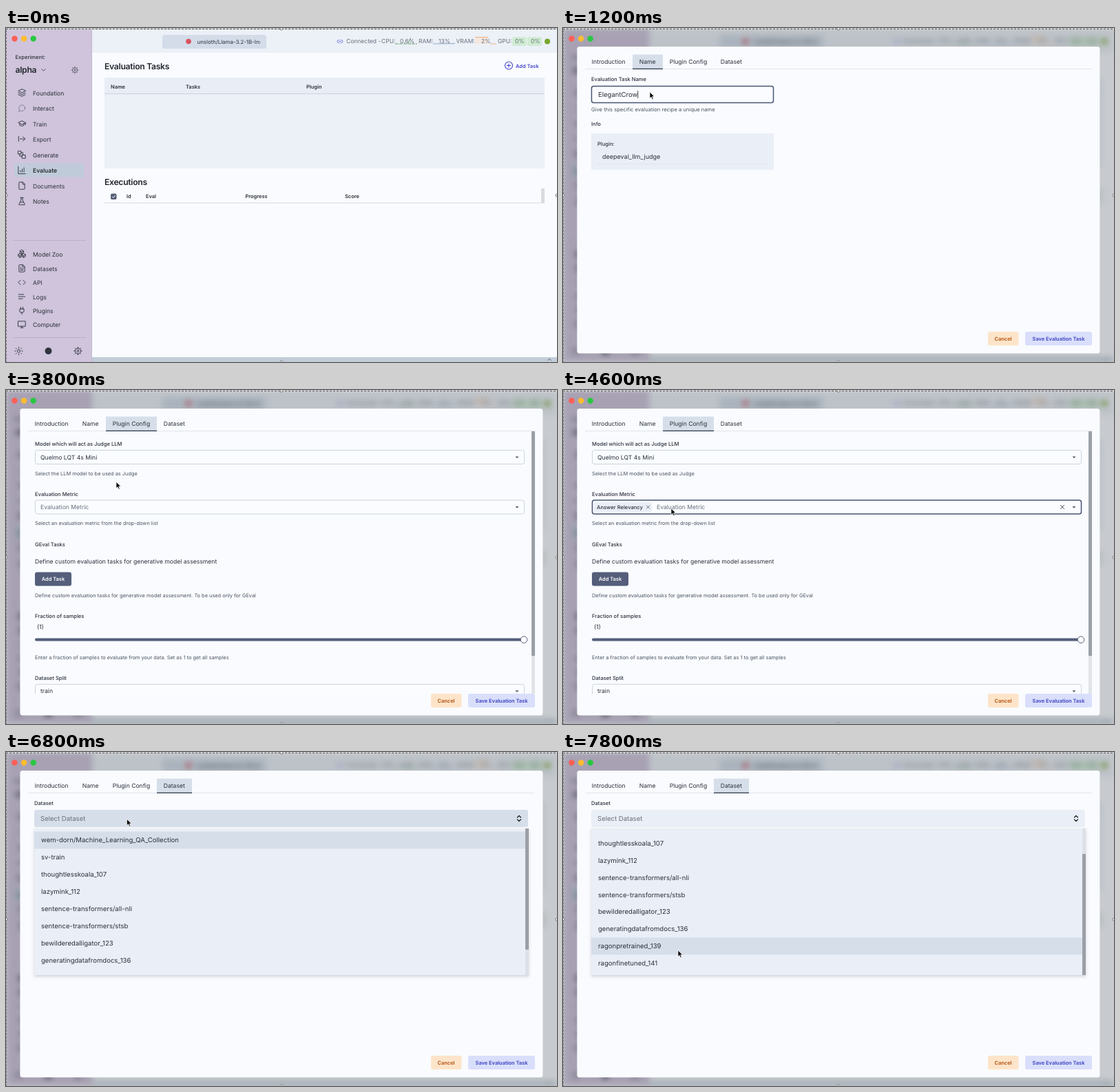
An HTML page for the animation above (8 s loop, 800 by 485 pixels).

```html
<!DOCTYPE html>
<html lang="en">
<head>
<meta charset="utf-8">
<title>Evaluation task setup</title>
<style>
  html, body { margin: 0; width: 100%; height: 100%; overflow: hidden; background: #f9fbfe; }
  svg { display: block; width: 800px; height: 485px; }
  text { font: 400 8.6px Inter, sans-serif; fill: #2b303b; white-space: pre; text-rendering: geometricPrecision; }
  .small { font-size: 7.4px; fill: #4d5562; }
  .label { font-size: 7.6px; font-weight: 500; }
  .strong { font-size: 7.45px; font-weight: 600; }
  .title { font-size: 12.2px; font-weight: 600; letter-spacing: -.025em; fill: #22262e; }
  .input { font-size: 9.55px; }
  .status { font-size: 8.5px; fill: #68707c; }
  .active { font-weight: 500; fill: #171a1c; }
  .muted { fill: #68707c; }
  .middle { text-anchor: middle; }
  .icon { fill: none; stroke: #30343f; stroke-width: 1.8; stroke-linecap: round; stroke-linejoin: round; }
  .field { fill: #fafcff; stroke: #cbd4df; }
  .focus { stroke: #475473; stroke-width: 1.5; }
  .blurred { filter: blur(4px); }
</style>
</head>
<body>
<svg id="stage" viewBox="0 0 800 485">
  <defs>
    <clipPath id="modelClip"><rect x="270" y="10" width="99" height="20"/></clipPath>
    <clipPath id="configClip"><rect x="32" y="60" width="736" height="381"/></clipPath>
    <clipPath id="listClip"><rect x="41" y="111" width="718" height="213"/></clipPath>
    <filter id="shadow" x="-5%" y="-5%" width="110%" height="115%">
      <feDropShadow dx="0" dy="2" stdDeviation="2" flood-color="#4a5568" flood-opacity=".25"/>
    </filter>
  </defs>
  <g id="app"></g>
  <g id="modal">
    <rect width="800" height="485" fill="#32383e" opacity=".25"/>
    <rect x="20.4" y="27" width="759" height="445.6" rx="3.5" fill="#f9fbfe"/>
    <g id="tabs"></g>
    <g id="namePage"></g>
    <g id="configPage"></g>
    <g id="datasetPage"></g>
    <g id="actions"></g>
  </g>
  <g id="frame"></g>
  <path id="cursor" d="M0 0v9.2l2.1-2 1.5 3.4 1.6-.7-1.5-3.3h3z" fill="#000" stroke="#fff" stroke-width=".7"/>
</svg>
<script>
const $ = id => document.getElementById(id);

// Markup helpers; text is placed by its vertical centre.
const text = (x, y, s, cls = '', attrs = '') =>
  `<text x="${x}" y="${y}" dy=".35em" class="${cls}" ${attrs}>${s}</text>`;
const rect = (x, y, w, h, fill, attrs = '') =>
  `<rect x="${x}" y="${y}" width="${w}" height="${h}" fill="${fill}" ${attrs}/>`;
const line = (x1, y1, x2, y2, color, width = 1, attrs = '') =>
  `<path d="M${x1} ${y1}L${x2} ${y2}" stroke="${color}" stroke-width="${width}" fill="none" ${attrs}/>`;
const circle = (x, y, r, fill, attrs = '') => `<circle cx="${x}" cy="${y}" r="${r}" fill="${fill}" ${attrs}/>`;
const icon = (x, y, d, scale = .52, attrs = '') =>
  `<path class="icon" d="${d}" transform="translate(${x} ${y}) scale(${scale}) translate(-12 -12)" ${attrs}/>`;
const caretDown = y => `<path d="M739.5 ${y - 1}h5l-2.5 2.8z" fill="#555e68"/>`;
const select = (y, value, id = '') =>
  `<rect x="42.5" y="${y - 10}" width="710" height="20" rx="3" class="field" id="${id}"/>${text(50, y, value)}${caretDown(y)}`;

const rays = 'M12 1v3M12 20v3M1 12h3M20 12h3M4 4l2 2M18 18l2 2M4 20l2-2M18 6l2-2';
const file = 'M14 2H6a2 2 0 0 0-2 2v16a2 2 0 0 0 2 2h12a2 2 0 0 0 2-2V8zM14 2v6h6';
const ring = r => `M12 ${12 - r}a${r} ${r} 0 1 0 0 ${2 * r} ${r} ${r} 0 1 0 0-${2 * r}`;
const box = (x, y) => `M${x} ${y}l5 3v5l-5 3-5-3v-5zM${x - 5} ${y + 3}l5 3 5-3M${x} ${y + 6}v5`;
const gear = ring(3) + ring(8) + rays;
const sun = ring(4) + rays;

const navigation = [
  ['Foundation', 94, 'M12 2 2 7l10 5 10-5zM2 12l10 5 10-5M2 17l10 5 10-5'],
  ['Interact', 116.5, 'M21 11.5a8.5 8.5 0 0 1-12.5 7.5L3 21l2-5.5A8.5 8.5 0 1 1 21 11.5z'],
  ['Train', 139, 'M22 9 12 4 2 9l10 5zM6 11v5c3 3 9 3 12 0v-5M22 9v6'],
  ['Export', 161, 'M3 5v14M7 12h14M15 6l6 6-6 6'],
  ['Generate', 184, 'M2 2h8v8H2zM13 13h9v9h-9zM10 6h5v7M6 10v6h7'],
  ['Evaluate', 206.5, 'M2 2v20h20M8 17v-4M13 17V9M18 17V5'],
  ['Documents', 229, file],
  ['Notes', 251.5, 'M8 2h8M10 2v7L4 20a1 1 0 0 0 1 2h14a1 1 0 0 0 1-2L14 9V2M7 15h10'],
  ['Model Zoo', 328, box(12, 1) + box(7, 11) + box(17, 11)],
  ['Datasets', 349, file + 'M8 13h8M8 17h8M8 9h2'],
  ['API', 369.5, 'M16 18l6-6-6-6M8 6l-6 6 6 6'],
  ['Logs', 390, 'M3 6h14M3 12h18M3 18h11'],
  ['Plugins', 410.5, 'M12 22v-5M9 8V2M15 8V2M18 8v5a4 4 0 0 1-4 4h-4a4 4 0 0 1-4-4V8z'],
  ['Computer', 430.5, 'M2 3h20v14H2zM8 21h8M12 17v4'],
];
const datasets = ['wem-dorn/Machine_Learning_QA_Collection', 'sv-train', 'thoughtlesskoala_107',
  'lazymink_112', 'sentence-transformers/all-nli', 'sentence-transformers/stsb',
  'bewilderedalligator_123', 'generatingdatafromdocs_136', 'ragonpretrained_139', 'ragonfinetuned_141'];
const tabs = [['Introduction', 32, 69], ['Name', 101, 44], ['Plugin Config', 145, 74], ['Dataset', 219, 51]];

const sidebar = rect(0, 0, 125, 485, '#cfc4db') + line(124.5, 3, 124.5, 485, '#c1b8cf') +
  text(13.5, 42.5, 'Experiment:', 'label') + text(13.5, 61, 'alpha', 'title') +
  icon(54.5, 61, 'M6 9l6 6 6-6', .45) + icon(100, 61, gear, .45, 'opacity=".75"') +
  rect(12, 196.5, 101, 20, '#c0cbda', 'rx="2"') +
  navigation.map(([label, y, d]) =>
    icon(23, y, d, .52, label === 'Interact' ? 'opacity=".45"' : '') +
    text(39, y + .5, label, label === 'Evaluate' ? 'active' : '')).join('') +
  line(10, 308.5, 116, 308.5, '#b9afc7') + line(10, 449.5, 116, 449.5, '#b9afc7') +
  icon(18.5, 469, sun) + circle(61.5, 469, 5, '#30343f') + icon(104.5, 469, gear);

const header = rect(125, 3, 675, 33, '#ecf0f7') + rect(227, 10, 151, 20, '#d3dce8', 'rx="3.5"') +
  circle(265, 19.5, 3.8, '#d9535f') +
  `<g clip-path="url(#modelClip)">${text(277.5, 20, 'unsloth/Llama-3.2-1B-Instruct', '', 'style="font-size:7.9px"')}</g>` +
  icon(485, 19.5, 'M9 17H7a5 5 0 0 1 0-10h2M15 7h2a5 5 0 0 1 0 10h-2M8 12h8', .4, 'style="stroke:#5a5be0"') +
  rect(681, 13, 19, 10, '#f5e8e0') + rect(735, 13, 21, 13, '#d0ecd3', 'rx="2"') + rect(757, 13, 21, 13, '#d0ecd3', 'rx="2"') +
  line(565, 23, 597, 23, '#69a86d', 1, 'stroke-dasharray="5 1"') + line(584, 22, 588, 14, '#69a86d', .8) +
  line(620, 23, 652, 22.5, '#8ca6c9') + line(681, 13.5, 700, 13.5, '#eea15f', .8) + line(703, 23, 712, 23, '#eea15f', .8) +
  [[494, 'Connected -'], [545, 'CPU:'], [572, '0.6%'], [599, 'RAM:'], [628, '13%'], [653.5, 'VRAM:'],
   [690, '2%'], [714, 'GPU:'], [739, '0%'], [762, '0%']].map(([x, s]) => text(x, 19.5, s, 'status')).join('') +
  circle(786, 19.5, 4, '#77a72e');

const tables = text(143, 55.5, 'Evaluation Tasks', 'title') +
  circle(730, 54.5, 5.5, 'none', 'stroke="#4446c8" stroke-width="1.1"') +
  line(727, 54.5, 733, 54.5, '#4446c8') + line(730, 51.5, 730, 57.5, '#4446c8') +
  text(740, 55, 'Add Task', 'strong', 'style="fill:#4446c8"') +
  rect(143, 72, 639, 132, '#ecf0f7') + rect(143, 72, 639, 23, '#e9edf5') + line(143, 95.5, 782, 95.5, '#cbd4df') +
  [[152, 85, 'Name'], [261, 85, 'Tasks'], [436, 85, 'Plugin'], [175, 244, 'Id'], [203, 244, 'Eval'],
   [347.5, 244, 'Progress'], [492, 244, 'Score']].map(([x, y, s]) => text(x, y, s, 'strong')).join('') +
  text(143, 223.5, 'Executions', 'title') + line(143, 254, 782, 254, '#d3dae3') + rect(777, 233, 5, 21, '#d8dbe0') +
  rect(152, 240.5, 8.5, 8.5, '#555e74', 'rx="2"') +
  '<path d="M154 244.8l1.7 1.7 3-3.5" fill="none" stroke="#fff"/>';

$('app').innerHTML = rect(0, 0, 800, 485, '#f9fbfe') + sidebar + header + tables +
  rect(125, 478, 675, 7, '#c3cdda') + icon(789, 481.5, 'M6 15l6-6 6 6', .4);

$('frame').innerHTML = rect(0, 0, 800, 2.5, '#d4d5d8') +
  line(0, 1.5, 800, 1.5, '#55575c', 1, 'stroke-dasharray="3 2"') +
  line(.5, 3, .5, 485, '#77797f', 1, 'stroke-dasharray="3 2"') +
  [[400, 1], [0, 243], [800, 243], [400, 485]].map(([x, y]) => circle(x, y, 2, '#fff', 'stroke="#777"')).join('') +
  ['#fe5f57', '#febc2e', '#28c840'].map((c, i) => circle(12.5 + 13.6 * i, 15.5, 4.2, c)).join('');

$('namePage').innerHTML = text(41, 74.5, 'Evaluation Task Name', 'label') +
  '<rect x="41.5" y="84.5" width="264" height="24" rx="3" class="field focus"/>' +
  text(51, 96.5, '', 'input', 'id="taskName"') + rect(0, 91, .8, 11, '#222', 'id="caret"') +
  text(41, 118, 'Give this specific evaluation recipe a unique name', 'small', 'style="font-size:7.6px"') +
  text(41, 139, 'Info', 'label') + rect(41, 153, 265, 53, '#eaeef6') + text(50, 168, 'Plugin:', 'label') +
  text(57, 187, 'deepeval_llm_judge', '', 'style="font-size:9px"') + line(50, 197.5, 297, 197.5, '#e0e5ed');

const chip = (id, x, w, label) => `<g id="${id}">${rect(x, 163, w, 14, '#eaeef6', 'rx="3"')}
  ${text(x + 4, 170, label, 'label')}${icon(x + w - 5.5, 170, 'M6 6l12 12M18 6 6 18', .36)}</g>`;

$('configPage').innerHTML = `<g clip-path="url(#configClip)"><g id="configScroll">
  ${text(42, 78.5, 'Model which will act as Judge LLM', 'label')}
  ${select(97.5, 'Quelmo LQT 4s Mini')}
  ${text(42, 121, 'Select the LLM model to be used as Judge', 'small')}
  ${text(42, 151.5, 'Evaluation Metric', 'label')}
  ${select(170, '', 'metricField')}
  ${chip('chipAnswer', 45, 84, 'Answer Relevancy')}${chip('chipPrecision', 133, 93, 'Contextual Precision')}
  ${text(50, 170, 'Evaluation Metric', 'muted', 'id="metricHint"')}
  ${icon(725, 170, 'M6 6l12 12M18 6 6 18', .45, 'id="clearMetric"')}
  ${text(42, 193.5, 'Select an evaluation metric from the drop-down list', 'small')}
  ${text(42, 224, 'GEval Tasks', 'label')}
  ${text(42, 249, 'Define custom evaluation tasks for generative model assessment')}
  ${rect(42, 264.5, 53, 20, '#555e7a', 'rx="3"')}${text(68.5, 274.5, 'Add Task', 'strong middle', 'style="fill:#fff"')}
  ${text(42, 298, 'Define custom evaluation tasks for generative model assessment. To be used only for GEval', 'small')}
  ${text(42, 328.5, 'Fraction of samples', 'label')}${text(45, 344, '', '', 'id="fraction"')}
  ${rect(42, 360.5, 710, 4, '#d9dfe8', 'rx="2"')}${rect(42, 360.5, 710, 4, '#555e7a', 'rx="2" id="sliderFill"')}
  ${circle(752, 362.6, 4.8, '#fff', 'stroke="#555e7a" id="sliderThumb"')}
  <g id="sliderTip">${rect(104, 341, 18, 13, '#555e70', 'rx="2"')}<path d="M110.5 354h5l-2.5 2.5z" fill="#555e70"/>
  ${text(113, 347.5, '0.1', 'middle', 'style="fill:#fff;font-size:7.4px"')}</g>
  ${text(42, 388, 'Enter a fraction of samples to evaluate from your data. Set as 1 to get all samples', 'small')}
  ${text(42, 418.5, 'Dataset Split', 'label')}${select(437.3, 'train')}
  ${text(42, 460.5, 'Select the dataset split to evaluate the model on', 'small')}
  </g>${rect(763, 60, 5, 381, '#e0e3e8')}${rect(763, 60, 5, 326, '#9b9fa7', 'id="configBar"')}</g>`;

$('datasetPage').innerHTML = text(41, 74.5, 'Dataset', 'label') +
  rect(41, 84, 717, 25, '#eaeef6', 'rx="3" id="datasetField"') + text(50, 96.5, 'Select Dataset', 'input muted') +
  icon(745, 96.5, 'M7 9l5-5 5 5M7 15l5 5 5-5', .5, 'style="stroke:#171a1c;stroke-width:2.4"') +
  `<g id="list">${rect(41, 111, 718, 213, '#eaeef6', 'filter="url(#shadow)"')}
  <g clip-path="url(#listClip)"><g id="listScroll">${rect(41, 115.5, 713, 25, '#d6dfe9', 'id="listHover"')}
  ${datasets.map((name, i) => text(51, 128 + 24.9 * i, name, 'input')).join('')}</g>
  ${rect(754, 111, 5, 213, '#dde1e7')}${rect(754, 111, 5, 176, '#9b9fa7', 'id="listBar"')}</g></g>`;

$('actions').innerHTML = rect(617, 441, 44.5, 20, '#fde4c9', 'rx="3"') +
  text(639, 451, 'Cancel', 'strong middle', 'style="fill:#b4500f"') +
  rect(671, 441, 97, 20, '#d9dffb', 'rx="3"') +
  text(719.5, 451, 'Save Evaluation Task', 'strong middle', 'style="fill:#3b3fc0"');

const cursorPath = [[200, 690, 120], [400, 752, 57], [600, 752, 57], [1000, 123, 52], [1200, 126, 93],
  [2600, 126, 93], [3000, 175, 60], [3200, 180, 50], [3600, 160, 97], [4000, 160, 170], [4600, 157, 172],
  [5000, 176, 172], [5400, 97, 299], [5800, 97, 299], [6200, 242, 52], [6600, 176, 97], [7000, 175, 98],
  [7400, 168, 255], [7800, 167, 288], [8000, 167, 288]];

const progress = (t, from, to) => Math.min(1, Math.max(0, (t - from) / (to - from)));
const show = (id, on) => $(id).setAttribute('visibility', on ? 'inherit' : 'hidden');
const shift = (id, y) => $(id).setAttribute('transform', `translate(0 ${y})`);

function cursorAt(t) {
  const i = Math.max(1, cursorPath.findIndex(key => key[0] > t));
  const [t0, x0, y0] = cursorPath[i - 1], [t1, x1, y1] = cursorPath[i];
  const p = progress(t, t0, t1), eased = p * p * (3 - 2 * p);
  return [x0 + (x1 - x0) * eased, y0 + (y1 - y0) * eased];
}

function drawName(t) {
  const finalName = 'EvalPreTrainedRAG';
  const typed = Math.floor(finalName.length * progress(t, 1400, 2600));
  $('taskName').textContent = t < 1400 ? 'ElegantCrow' : finalName.slice(0, typed);
  $('caret').setAttribute('x', 51 + $('taskName').getComputedTextLength());
}

function drawConfig(t) {
  const scroll = progress(t, 5000, 5400), metrics = (t >= 4400) + (t >= 5000);
  const value = t < 5400 ? 1 : .1, active = t >= 5400 && t < 6000;
  shift('configScroll', -64.6 * scroll);
  shift('configBar', 55 * scroll);
  show('chipAnswer', metrics > 0);
  show('chipPrecision', metrics > 1);
  $('metricHint').setAttribute('x', [50, 136, 233][metrics]);
  const focused = t >= 4000 && t < 5200;
  $('metricField').setAttribute('class', focused ? 'field focus' : 'field');
  show('clearMetric', focused && metrics);
  $('fraction').textContent = `(${value})`;
  $('sliderFill').setAttribute('width', 710 * value);
  $('sliderFill').setAttribute('fill', active ? '#343b52' : '#555e7a');
  $('sliderThumb').setAttribute('cx', 42 + 710 * value);
  show('sliderTip', active);
}

function drawDataset(t, y) {
  const scroll = progress(t, 7000, 7600), offset = 45.3 * scroll;
  const row = y > 111 ? Math.floor((y + offset - 115.5) / 24.9) : 0;
  shift('listScroll', -offset);
  shift('listBar', 37 * scroll);
  shift('listHover', 24.9 * Math.max(0, row));
  $('datasetField').setAttribute('fill', y > 84 && y < 109 ? '#d6dfe9' : '#eaeef6');
  show('list', t >= 6600);
}

function draw(now) {
  const t = Math.floor(now % 8000 / 200) * 200;
  const [x, y] = cursorAt(t), open = t >= 600;
  const page = t < 3200 ? 1 : t < 6200 ? 2 : 3;
  $('app').setAttribute('class', open ? 'blurred' : '');
  show('modal', open);
  $('tabs').innerHTML = line(32, 59.5, 768, 59.5, '#e1e6ee') + tabs.map(([label, left, width], i) =>
    (i === page ? rect(left, 38.6, width, 21, '#d6dfe9') + line(left, 59.4, left + width, 59.4, '#30384a', 1.2) : '') +
    text(left + 9.7, 49, label)).join('');
  ['namePage', 'configPage', 'datasetPage'].forEach((id, i) => show(id, page === i + 1));
  drawName(t);
  drawConfig(t);
  drawDataset(t, y);
  show('cursor', t >= 200);
  $('cursor').setAttribute('transform', `translate(${x} ${y})`);
}

const start = performance.now();
function tick() {
  draw(performance.now() - start);
  requestAnimationFrame(tick);
}
tick();
</script>
</body>
</html>
```
